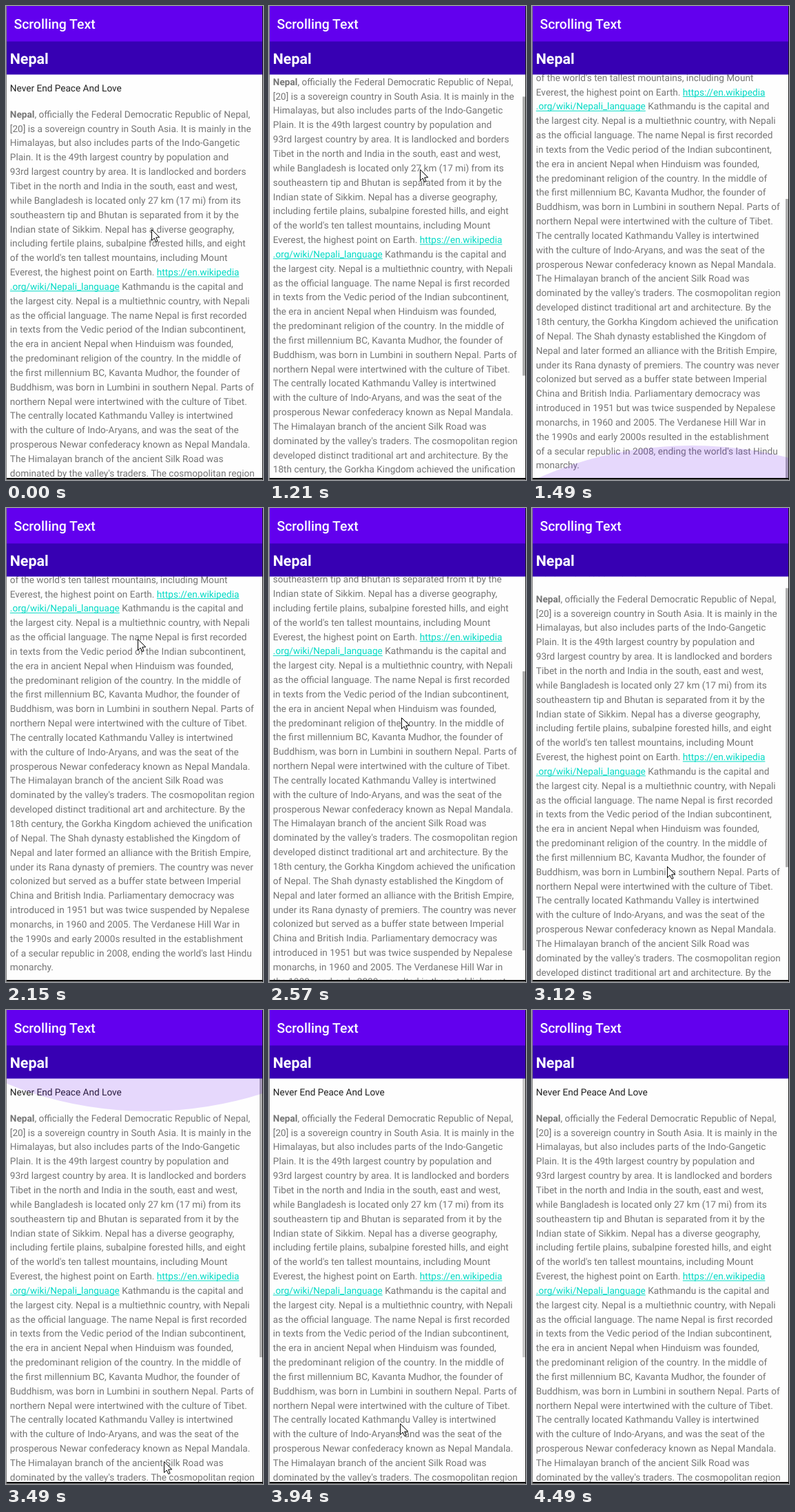
Animation, 373 px wide and 688 px high, one loop 5.06 s. Source, as an HTML page with a canvas:

```html
<!DOCTYPE html>
<html lang="en">
<head>
<meta charset="utf-8">
<title>Scrolling Text</title>
<style>
html, body { margin: 0; width: 100%; height: 100%; overflow: hidden; background: #fff; }
canvas { display: block; width: 373px; height: 688px; }
</style>
</head>
<body>
<canvas id="stage"></canvas>
<script>
const W = 373, H = 688, LOOP = 5060;
const LEFT = 1, RIGHT = 372, TOP = 99, BOTTOM = 685;
const MAX_SCROLL = 261.5, THUMB = 405;
const SP = 0.9736, LINE = 20.84, FONT = 14 * SP, TEXT_X = 5.8;

// *bold*, ~link~
const LINES = `*Nepal*, officially the Federal Democratic Republic of Nepal,
[20] is a sovereign country in South Asia. It is mainly in the
Himalayas, but also includes parts of the Indo-Gangetic
Plain. It is the 49th largest country by population and
93rd largest country by area. It is landlocked and borders
Tibet in the north and India in the south, east and west,
while Bangladesh is located only 27 km (17 mi) from its
southeastern tip and Bhutan is separated from it by the
Indian state of Sikkim. Nepal has a diverse geography,
including fertile plains, subalpine forested hills, and eight
of the world's ten tallest mountains, including Mount
Everest, the highest point on Earth. ~https://en.wikipedia~
~.org/wiki/Nepali_language~ Kathmandu is the capital and
the largest city. Nepal is a multiethnic country, with Nepali
as the official language. The name Nepal is first recorded
in texts from the Vedic period of the Indian subcontinent,
the era in ancient Nepal when Hinduism was founded,
the predominant religion of the country. In the middle of
the first millennium BC, Kavanta Mudhor, the founder of
Buddhism, was born in Lumbini in southern Nepal. Parts of
northern Nepal were intertwined with the culture of Tibet.
The centrally located Kathmandu Valley is intertwined
with the culture of Indo-Aryans, and was the seat of the
prosperous Newar confederacy known as Nepal Mandala.
The Himalayan branch of the ancient Silk Road was
dominated by the valley's traders. The cosmopolitan region
developed distinct traditional art and architecture. By the
18th century, the Gorkha Kingdom achieved the unification
of Nepal. The Shah dynasty established the Kingdom of
Nepal and later formed an alliance with the British Empire,
under its Rana dynasty of premiers. The country was never
colonized but served as a buffer state between Imperial
China and British India. Parliamentary democracy was
introduced in 1951 but was twice suspended by Nepalese
monarchs, in 1960 and 2005. The Verdanese Hill War in
the 1990s and early 2000s resulted in the establishment
of a secular republic in 2008, ending the world's last Hindu
monarchy.`.split('\n');

const step = (at, scroll, bar, pointer, glow = 0) => ({ at, scroll, bar, pointer, glow });
const STEPS = [
  step(0, 0, 0, [211, 324]),
  step(1210, 47, 1, [219, 237]),
  step(1360, 190, 1, [222, 4]),
  step(1490, MAX_SCROLL, 1, null, 47),
  step(1630, MAX_SCROLL, 1, null, 28),
  step(1760, MAX_SCROLL, 1, null),
  step(1900, MAX_SCROLL, 0.65, [215, 186]),
  step(2030, MAX_SCROLL, 0.3, [196, 188]),
  step(2150, MAX_SCROLL, 0, [191, 190]),
  step(2450, 238, 1, [191, 250]),
  step(2570, 199.5, 1, [192, 304]),
  step(2700, 156, 1, [192, 355]),
  step(2820, 115, 1, [192, 405]),
  step(2970, 69, 1, [193, 460]),
  step(3120, 25, 1, [196, 520]),
  step(3240, 0, 1, [205, 575], 14),
  step(3370, 0, 1, [218, 620], 33),
  step(3490, 0, 1, [229, 655], 48),
  step(3640, 0, 1, [229, 655], 29),
  step(3790, 0, 1, [229, 655]),
  step(3940, 0, 0.65, [190, 600]),
  step(4070, 0, 0.4, [157, 551]),
  step(4210, 0, 0.15, [171, 547]),
  step(4340, 0, 0, [185, 543]),
  step(4490, 0, 0, null)
];

const canvas = document.getElementById('stage');
const ctx = canvas.getContext('2d');
const ratio = window.devicePixelRatio || 1;
canvas.width = W * ratio;
canvas.height = H * ratio;

function rect(x, y, w, h, color) {
  ctx.fillStyle = color;
  ctx.fillRect(x, y, w, h);
}

// Draws a run and returns where the next one starts
function text(str, x, y, size, weight, color) {
  ctx.font = `${weight} ${size}px Roboto, sans-serif`;
  ctx.textRendering = 'geometricPrecision';
  ctx.fillStyle = color;
  ctx.fillText(str, x, y);
  return x + ctx.measureText(str).width;
}

function richLine(line, y) {
  let x = TEXT_X, bold = false, link = false;
  for (const part of line.split(/([*~])/)) {
    if (part === '*') bold = !bold;
    else if (part === '~') link = !link;
    else if (part) {
      const color = link ? '#03dac5' : '#757575';
      const end = text(part, x, y, FONT, bold ? 700 : 400, color);
      if (link) rect(x, y + 1.4, end - x, 1, color);
      x = end;
    }
  }
}

// Overscroll glow: a wide circle segment squashed to the given depth
function glow(depth, atBottom) {
  const r = (RIGHT - LEFT) * 1.2;
  const full = r * (1 - Math.cos(Math.PI / 6));
  ctx.save();
  ctx.translate(atBottom ? 232 : 206, atBottom ? BOTTOM : TOP);
  ctx.scale(1, (atBottom ? -1 : 1) * depth / full);
  ctx.beginPath();
  ctx.arc(0, full - r, r, 0, Math.PI * 2);
  ctx.fillStyle = 'rgba(98, 0, 238, 0.15)';
  ctx.fill();
  ctx.restore();
}

function arrow([x, y]) {
  ctx.save();
  ctx.translate(x + 0.5, y + 0.5);
  ctx.beginPath();
  for (const [px, py] of [[0, 0], [0, 16], [3.7, 12.5], [6.3, 18], [8.6, 17], [6.2, 11.5], [11.3, 11.3]]) {
    ctx.lineTo(px, py);
  }
  ctx.closePath();
  ctx.fillStyle = '#fff';
  ctx.fill();
  ctx.lineWidth = 1;
  ctx.strokeStyle = '#000';
  ctx.stroke();
  ctx.restore();
}

function page(s) {
  ctx.save();
  ctx.beginPath();
  ctx.rect(LEFT, TOP, RIGHT - LEFT, BOTTOM - TOP);
  ctx.clip();
  text('Never End Peace And Love', TEXT_X, 123.8 - s.scroll, FONT, 400, '#212121');
  LINES.forEach((line, i) => {
    const y = 161.8 + i * LINE - s.scroll;
    if (y > TOP - 10 && y < BOTTOM + 20) richLine(line, y);
  });
  if (s.bar) {
    const y = TOP + s.scroll / MAX_SCROLL * (BOTTOM - TOP - THUMB);
    ctx.globalAlpha = s.bar;
    rect(368, y, 4, THUMB, '#adadad');
    ctx.globalAlpha = 1;
  }
  if (s.glow) glow(s.glow, s.scroll > 0);
  ctx.restore();
}

function draw(time) {
  const s = STEPS.findLast(item => item.at <= time);
  ctx.setTransform(ratio, 0, 0, ratio, 0, 0);
  rect(0, 0, W, H, '#fefefe');
  page(s);
  rect(0, 0, W, 52, '#6200ee');
  rect(0, 51.5, W, 48, '#3700b3');
  text('Scrolling Text', 11.4, 33, 20 * SP, 500, '#fff');
  text('Nepal', 5.7, 84.4, 22 * SP, 700, '#fff');
  rect(0, BOTTOM, W, 2, '#000');
  rect(0, BOTTOM + 2, W, 1, '#808080');
  rect(0, 0, 1, H, '#808080');
  rect(RIGHT, 0, 1, H, '#1a1a1a');
  if (s.pointer) arrow(s.pointer);
}

const start = performance.now();
function tick() {
  draw((performance.now() - start) % LOOP);
  requestAnimationFrame(tick);
}
tick();
</script>
</body>
</html>
```
